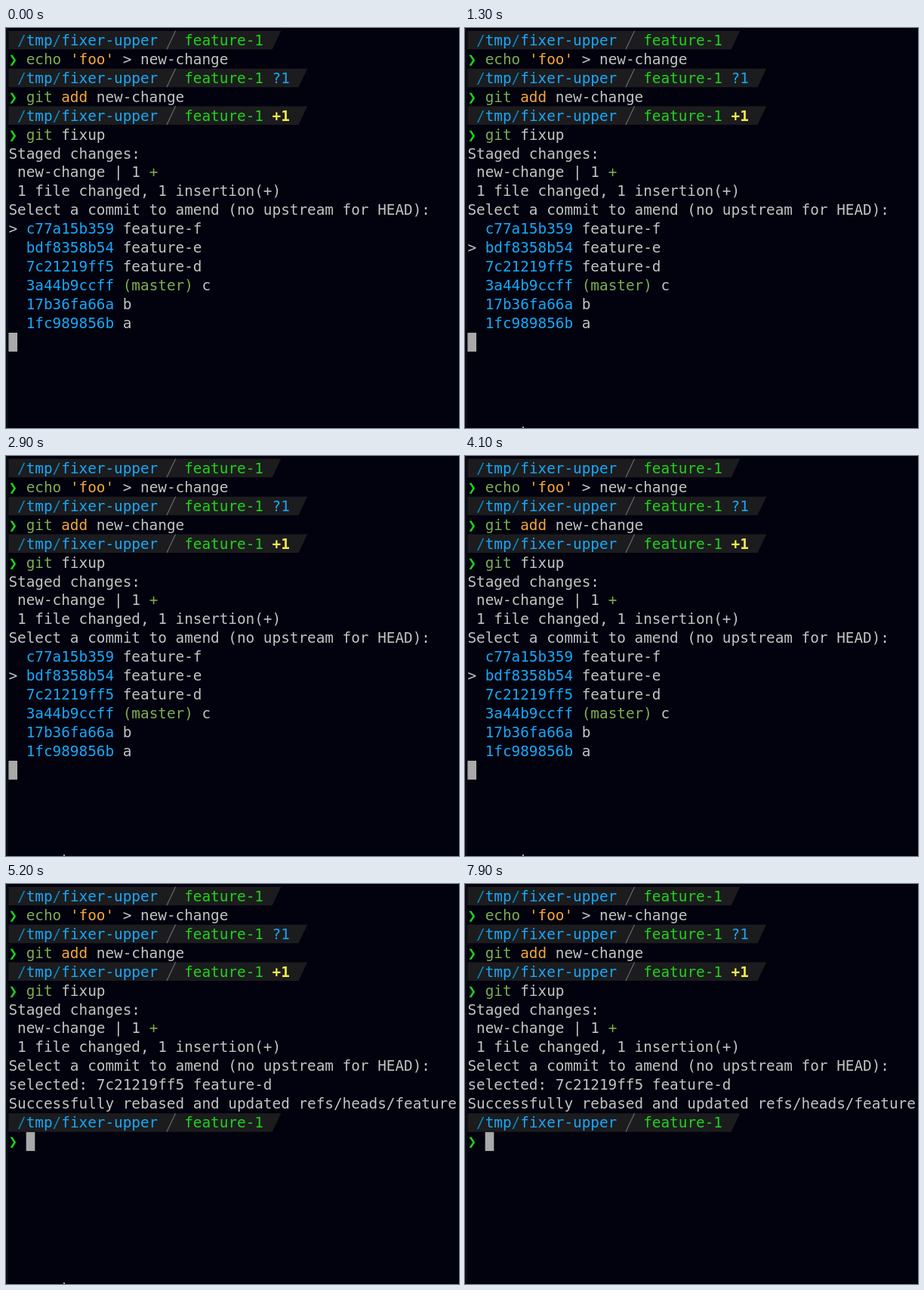
Animation, 600 px wide and 529 px high, one loop 8000 ms. Source, as an HTML page with a canvas:

```html
<!DOCTYPE html>
<html lang="en">
<head>
<meta charset="utf-8">
<style>
html, body { margin: 0; width: 100%; height: 100%; overflow: hidden; background: #01020d; }
canvas { display: block; }
</style>
</head>
<body>
<canvas id="stage" width="600" height="529"></canvas>
<script>
const ctx = document.getElementById('stage').getContext('2d');
const LOOP = 8000, LEFT = 3.4, TOP = 3.8, COL = 11.64, ROW = 24.95;
const NEXT = 900, NEXT_AGAIN = 4300, PICKED = 4600, DONE = 4800;
const TICK_ON = 500, TICK_OFF = 5900;
const GREY = '#c2c3c4', BLUE = '#17a8fb', DARK_BLUE = '#0b87bd', GREEN = '#1ed31a',
  OLIVE = '#7eac52', ORANGE = '#f4a63a', YELLOW = '#f3ea4c';
const commits = [
  ['c77a15b359', 'feature-f'], ['bdf8358b54', 'feature-e'], ['7c21219ff5', 'feature-d'],
  ['3a44b9ccff', 'c', '(master) '], ['17b36fa66a', 'b'], ['1fc989856b', 'a']
];

const colX = col => LEFT + col * COL;
const rowY = row => TOP + row * ROW;

// Writes alternating text and colour from the given cell.
function write(row, col, ...runs) {
  for (let i = 0; i < runs.length; i += 2) {
    ctx.fillStyle = runs[i + 1];
    ctx.fillText(runs[i], colX(col), rowY(row) + 19);
    col += runs[i].length;
  }
}

function bar(row, status = '', color = BLUE) {
  const y = rowY(row), end = colX(30 + (status && status.length + 1));
  ctx.fillStyle = '#1c1c1e';
  ctx.beginPath();
  ctx.moveTo(LEFT, y);
  ctx.lineTo(end + COL, y);
  ctx.lineTo(end, y + 24.5);
  ctx.lineTo(LEFT, y + 24.5);
  ctx.fill();
  ctx.strokeStyle = '#68696b';
  ctx.lineWidth = 1.2;
  ctx.beginPath();
  ctx.moveTo(colX(18), y + 24.5);
  ctx.lineTo(colX(19), y);
  ctx.stroke();
  write(row, 1, '/', DARK_BLUE, 'tmp', BLUE, '/', DARK_BLUE, 'fixer-upper', BLUE);
  write(row, 20, 'feature-1', GREEN);
  if (color === YELLOW) ctx.font = 'bold ' + ctx.font;
  write(row, 30, status, color);
  setFont();
}

function setFont() {
  ctx.font = '19.33px "DejaVu Sans Mono", monospace';
}

function prompt(row, ...runs) {
  write(row, 0, '❯', GREEN, ' ', GREY, ...runs);
}

function cursor(row, col) {
  ctx.fillStyle = '#a9a9a9';
  ctx.fillRect(colX(col), rowY(row), COL, ROW);
}

function draw(t) {
  ctx.fillStyle = '#01020d';
  ctx.fillRect(0, 0, 600, 529);
  ctx.fillStyle = '#0a0c12';
  ctx.fillRect(0, 0, 3, 529);
  setFont();

  bar(0);
  prompt(1, 'echo', OLIVE, " 'foo'", ORANGE, ' > new-change', GREY);
  bar(2, '?1');
  prompt(3, 'git', OLIVE, ' add', ORANGE, ' new-change', GREY);
  bar(4, '+1', YELLOW);
  prompt(5, 'git', OLIVE, ' fixup', GREY);
  write(6, 0, 'Staged changes:', GREY);
  write(7, 0, ' new-change | 1 ', GREY, '+', OLIVE);
  write(8, 0, ' 1 file changed, 1 insertion(+)', GREY);
  write(9, 0, 'Select a commit to amend (no upstream for HEAD):', GREY);

  if (t < PICKED) {
    commits.forEach(([hash, title, ref = ''], i) =>
      write(10 + i, 2, hash + ' ', BLUE, ref, OLIVE, title, GREY));
    write(10 + (t >= NEXT) + (t >= NEXT_AGAIN), 0, '>', GREY);
    cursor(16, 0);
  } else {
    write(10, 0, 'selected: 7c21219ff5 feature-d', GREY);
    if (t < DONE) {
      write(11, 0, 'hint: Waiting for your editor to close the file...', GREY);
      cursor(11, 51);
    } else {
      write(11, 0, 'Successfully rebased and updated refs/heads/feature-1.', GREY);
      bar(12);
      prompt(13);
      cursor(13, 2);
    }
  }

  if (t >= TICK_ON && t < TICK_OFF) {
    ctx.fillStyle = '#a0a2a6';
    ctx.fillRect(76, 527, 2, 2);
  }
}

function frame() {
  draw(performance.now() % LOOP);
  requestAnimationFrame(frame);
}
frame();
</script>
</body>
</html>
```
